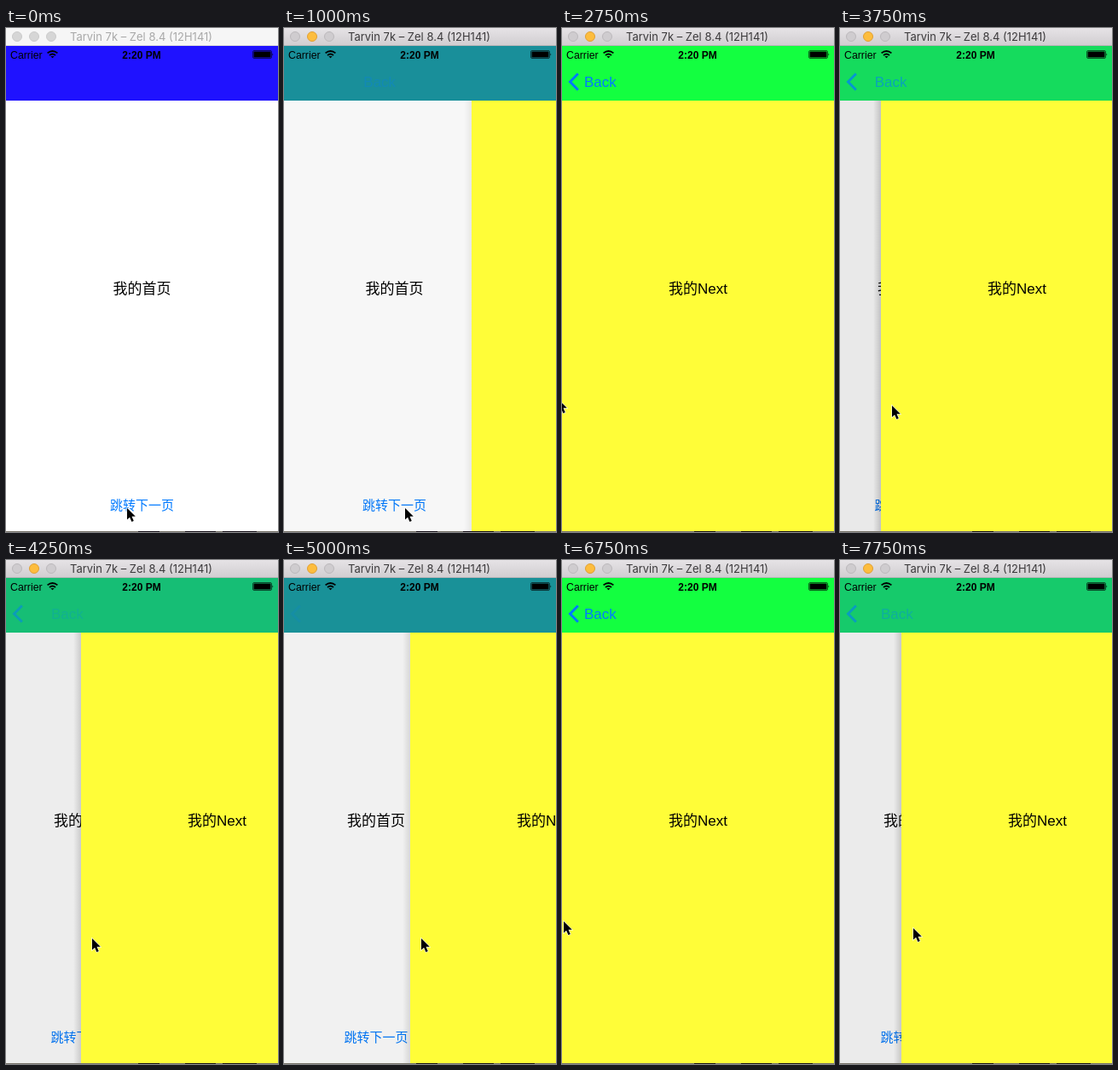
Write an HTML page that moves like this. It is 319x590 px and loops after 8 s.

```html
<!DOCTYPE html>
<html lang="zh-CN">
<head>
<meta charset="utf-8">
<title>Swipe back</title>
<style>
html, body { margin: 0; width: 100%; height: 100%; overflow: hidden; background: #fff; }
svg { display: block; width: 319px; height: 590px; }
text { font-family: "Liberation Sans", "Noto Sans CJK SC", "Noto Sans CJK", sans-serif; }
.mid { text-anchor: middle; }
.title { font: 13px Inter, sans-serif; }
.label { font-size: 17px; }
.link { font-size: 15px; fill: #007aff; }
.status { font-size: 12.3px; }
.clock { font-size: 12px; font-weight: bold; }
.back { font-size: 17px; fill: #007aff; }
</style>
</head>
<body>
<svg viewBox="0 0 319 590">
  <defs>
    <linearGradient id="chrome" x2="0" y2="1">
      <stop stop-color="#e6e3e6"/><stop offset="1" stop-color="#d1ced1"/>
    </linearGradient>
    <linearGradient id="shade">
      <stop stop-color="#000" stop-opacity="0"/><stop offset="1" stop-color="#000" stop-opacity=".2"/>
    </linearGradient>
  </defs>

  <g id="home">
    <rect y="85" width="420" height="505" fill="#fff"/>
    <text class="label mid" x="159.5" y="311">我的首页</text>
    <text class="link mid" x="159.5" y="563.5">跳转下一页</text>
  </g>
  <rect id="dim" y="85" width="319" height="505"/>

  <g id="next">
    <rect id="edge" x="-9" y="85" width="9" height="505" fill="url(#shade)"/>
    <rect y="85" width="320" height="505" fill="#fffd38"/>
    <text class="label mid" x="159.5" y="311">我的Next</text>
  </g>

  <rect id="bar" y="21" width="319" height="64"/>
  <path id="chevron" d="M18.8 53.5 9.5 63l9.3 9.5" fill="none" stroke="#007aff" stroke-width="3"/>
  <text id="back" class="back" y="69">Back</text>

  <text class="status" x="5" y="35.5">Carrier</text>
  <g fill="none" stroke="#000" stroke-width="1.9">
    <path d="M48.6 29.4q5.9-5 11.8 0M51 31.9q3.5-2.9 7 0"/>
    <path d="M52.4 33h4.2l-2.1 2.3z" fill="#000" stroke="none"/>
  </g>
  <text class="clock mid" x="159" y="35.5">2:20 PM</text>
  <rect x="289.5" y="26.5" width="22" height="9" rx="1.5" fill="none" stroke="#000" stroke-opacity=".6"/>
  <rect x="290.5" y="27.5" width="20" height="7" rx=".5"/>
  <path d="M312.5 29.5q1.6 1.5 0 3z"/>

  <rect id="frame" width="319" height="20"/>
  <rect id="rule" y="20" width="319" height="1"/>
  <g id="lights" stroke-width="1">
    <circle cx="13" cy="10" r="5.5"/><circle cx="33" cy="10" r="5.5"/><circle cx="53" cy="10" r="5.5"/>
  </g>
  <text id="title" class="title mid" x="158.5" y="15">Tarvin 7k – Zel 8.4 (12H141)</text>

  <path d="M0 589.5H319" stroke="#77736a"/>
  <path d="M155 589.5h25m30 0h36m8 0h40" stroke="#161018"/>

  <path id="cursor" d="M0 0V13.6l3.1-2.9 2.3 5.3 2.4-1-2.3-5.2h4.3z" stroke="#fff" stroke-width="1.2" paint-order="stroke"/>
</svg>
<script>
const LOOP = 8000, WIDTH = 320;
const GREEN = [19, 255, 64], BLUE = [31, 18, 255];

// start ms, left edge of the upper page, pointer x, pointer y
const STEPS = [
  [0, 320, 142, 562], [1000, 220, 142, 562], [1250, 18, 142, 562],
  [1500, 0, 128, 545], [1750, 0, 58, 472], [2000, 0, 11, 436],
  [2250, 0, 4, 435], [2500, 0, -2, 435], [2750, 0, -4, 435],
  [3250, 4, 17, 437], [3500, 24, 37, 440], [3750, 48, 61, 442],
  [4000, 70, 83, 443], [4250, 88, 101, 443],
  [4500, 108, 121, 443], [4750, 130, 143, 443], [5000, 148, 161, 443],
  [5500, 122, 135, 441], [5750, 78, 91, 436], [6000, 34, 47, 430],
  [6250, 4, 17, 426], [6500, 0, 6, 424], [6750, 0, 2, 423],
  [7000, 8, 22, 425], [7250, 28, 42, 428], [7500, 52, 66, 430], [7750, 72, 86, 431]
];

const $ = id => document.getElementById(id);
const set = (id, attrs) => {
  for (const key in attrs) $(id).setAttribute(key, attrs[key]);
};
const move = (id, x, y = 0) => set(id, { transform: `translate(${x} ${y})` });
const fade = (x, range) => Math.max(0, 1 - x / range);

function paintWindow(active) {
  set('frame', { fill: active ? 'url(#chrome)' : '#f6f6f6' });
  set('rule', { fill: active ? '#b7b4b7' : '#d8d8d8' });
  set('title', { fill: active ? '#3c3a3c' : '#a9a9a9' });
  set('lights', { fill: active ? '#cfcccf' : '#d6d6d6', stroke: active ? '#bcb9bc' : '#cbcbcb' });
  const middle = $('lights').children[1];
  middle.setAttribute('fill', active ? '#fdbd3e' : '#d6d6d6');
  middle.setAttribute('stroke', active ? '#e0a034' : '#cbcbcb');
}

function draw(time) {
  const [start, x, px, py] = STEPS.findLast(step => step[0] <= time);
  const open = x / WIDTH, pushing = start < 1500;
  const mix = pushing ? open * open : open;

  move('home', -96 * (1 - open));
  move('next', x);
  move('cursor', px, py);
  set('dim', { opacity: 0.1 * (1 - open) });
  set('edge', { opacity: 1 - open });
  set('bar', { fill: `rgb(${GREEN.map((c, i) => Math.round(c + (BLUE[i] - c) * mix))})` });
  set('chevron', { opacity: fade(x, pushing ? 24 : 170) });
  set('back', { x: 26 + 0.306 * x, opacity: fade(x, pushing ? 300 : 110) });
  paintWindow(start > 0);
}

const origin = performance.now();
function tick() {
  draw((performance.now() - origin) % LOOP);
  requestAnimationFrame(tick);
}
tick();
</script>
</body>
</html>
```
